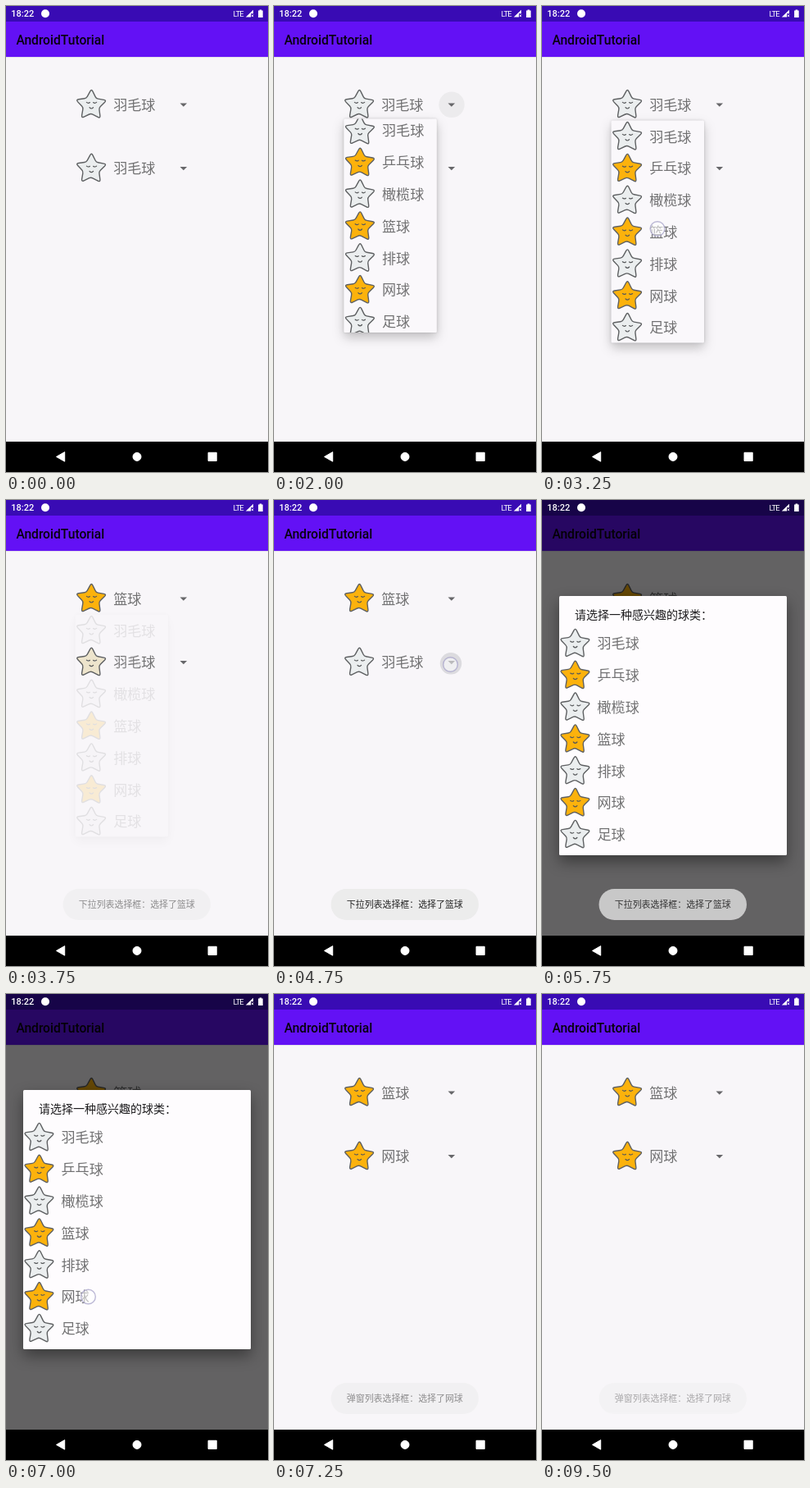
Animation, 320 px wide and 568 px high, one loop 9750 ms. Source, as an HTML page:

```html
<!DOCTYPE html>
<html lang="zh-CN">
<head>
<meta charset="utf-8">
<title>Spinner demo</title>
<style>
  html, body { margin: 0; width: 100%; height: 100%; overflow: hidden; background: #f8f6f9; }
  svg { display: block; }
  text { font-family: "Noto Sans CJK SC", "Noto Sans CJK", "Noto Sans", sans-serif; }
  .ui { font-family: Roboto, "Noto Sans", sans-serif; }
  .label { font-size: 17.1px; fill: #717172; }
  .card { filter: drop-shadow(0 6px 7px rgba(0,0,0,.2)) drop-shadow(0 0 1.5px rgba(0,0,0,.16)); }
  .dialog-card { filter: drop-shadow(0 8px 9px rgba(0,0,0,.4)); }
</style>
</head>
<body>
<svg id="stage" width="320" height="568" viewBox="0 0 320 568">
  <defs>
    <g id="star" stroke-linejoin="round" stroke-linecap="round">
      <path id="starBody" stroke="#5e6062" stroke-width="1.4"/>
      <path d="M-5.6 -3.4q2 1.7 4 .2M2.6 -3.2q2 1.5 4 -.2M-2 2.9q2.3 2.6 4.6 0" fill="none" stroke="#555759" stroke-width="1.2"/>
    </g>
    <path id="arrow" d="M-4.3 -2h8.6l-4.3 4.2z" fill="#67676a"/>
    <clipPath id="popClip"><rect id="popClipRect"/></clipPath>
  </defs>

  <rect width="320" height="568" fill="#f8f6f9"/>
  <rect y="62" width="320" height="1" fill="#e3dfea"/>
  <rect y="19" width="320" height="43" fill="#6311f5"/>
  <rect width="320" height="19" fill="#390bb4"/>
  <text class="ui" x="12.4" y="46.6" font-size="15.6" font-weight="500" fill="#08020f">AndroidTutorial</text>

  <circle id="ripple"/>
  <g id="first"></g>
  <g id="second"></g>
  <use href="#arrow" x="216.8" y="120.5"/>
  <use href="#arrow" x="216.8" y="198"/>

  <g id="popup">
    <rect id="popCard" class="card" rx="1.5" fill="#faf8fb"/>
    <g clip-path="url(#popClip)"><g id="popRows"></g></g>
  </g>

  <rect id="dim" width="320" height="531"/>
  <g id="dialog">
    <rect class="dialog-card" x="21" y="117" width="278" height="316" rx="1.5" fill="#fefcfe"/>
    <text x="40" y="145.2" font-size="14" fill="#1d1c1e">请选择一种感兴趣的球类：</text>
    <g id="dialogRows"></g>
  </g>

  <g id="toast">
    <rect x="69.5" y="474" width="180.5" height="38" rx="19" fill="#ececec"/>
    <text id="toastText" x="88.8" y="497.2" font-size="10.93" fill="#242424"></text>
  </g>
  <circle id="touch" r="8.8" fill="#fff" fill-opacity=".55" stroke="#a5a1c8" stroke-opacity=".75" stroke-width="1.4"/>

  <g fill="#fff">
    <text class="ui" x="6.3" y="13.3" font-size="11" font-weight="500">18:22</text>
    <circle cx="48" cy="9.3" r="5"/>
    <text class="ui" x="277.6" y="12.8" font-size="9.4" letter-spacing="-.9">LTE</text>
    <path d="M302 4.8v4.4h-3v4.3h-6.2z"/>
    <path d="M299.7 10.5l2.4 2.6m0-2.6l-2.4 2.6" stroke="#fff" stroke-width=".9"/>
    <path d="M309.6 4.4h2.6v1h1.5v8.6h-5.6v-8.6h1.5z"/>
  </g>

  <rect y="531" width="320" height="37"/>
  <g fill="#fff" stroke="#fff" stroke-linejoin="round">
    <path d="M61.5 549.4L71.7 543.6V555.2z"/>
    <circle cx="160" cy="549.4" r="5"/>
    <rect x="247" y="544.3" width="10.2" height="10.2"/>
  </g>
</svg>
<script>
const $ = id => document.getElementById(id);
const balls = ["羽毛球", "乒乓球", "橄榄球", "篮球", "排球", "网球", "足球"];
const PITCH = 38.83, LOOP = 9750;

const picked = {
  drop: "下拉列表选择框：选择了篮球",
  box: "弹窗列表选择框：选择了网球"
};

// Each step keeps the values of the one before it.
const steps = [
  [0, { first: 0, second: 0, touch: null, ripple: null, pop: 1, popAlpha: 0, dim: 0, dialog: 0, toast: 0, note: "drop" }],
  [1500, { touch: [216.5, 117.5] }],
  [1750, { touch: null, ripple: [217, 120, 14, "#e8e7ea"] }],
  [2000, { ripple: [217, 120.3, 15.7, "#ecebed"], pop: .955, popAlpha: 1 }],
  [3250, { ripple: null, pop: 1, touch: [141, 271.5] }],
  [3500, { touch: null }],
  [3750, { first: 3, popAlpha: .15, toast: .5 }],
  [4000, { popAlpha: 0, toast: 1 }],
  [4500, { touch: [215.5, 200.5] }],
  [4750, { ripple: [216, 199.3, 13.2, "#dcdbdf"] }],
  [5000, { touch: null, dim: .3, dialog: .5 }],
  [5250, { ripple: null, dim: .6, dialog: 1 }],
  [5750, { toast: .74 }],
  [6000, { toast: .12 }],
  [6250, { toast: 0 }],
  [7000, { touch: [100.5, 369] }],
  [7250, { touch: null, dim: 0, dialog: 0, second: 5, note: "box", toast: .5 }],
  [7500, { toast: 1 }],
  [9250, { toast: .8 }],
  [9500, { toast: .37 }]
];
const states = [];
steps.reduce((prev, [at, change]) => {
  const next = { ...prev, ...change };
  states.push([at, next]);
  return next;
}, {});

function starPath(outer, inner) {
  const pts = Array.from({ length: 10 }, (_, i) => {
    const a = (i / 5 - .5) * Math.PI + .02, r = i % 2 ? inner : outer;
    return [r * Math.cos(a), r * Math.sin(a)];
  });
  const mix = (a, b, k) => a.map((v, i) => (v + (b[i] - v) * k).toFixed(2)).join(" ");
  return pts.map((p, i) => {
    const before = pts[(i + 9) % 10], after = pts[(i + 1) % 10], k = i % 2 ? .18 : .27;
    return `${i ? "L" : "M"}${mix(p, before, k)}Q${mix(p, p, 0)} ${mix(p, after, k)}`;
  }).join("") + "Z";
}

const row = (i, x, y) =>
  `<use href="#star" x="${x}" y="${y + .6}" fill="${i % 2 ? "#fcb20c" : "#ebeeef"}"/>` +
  `<text class="label" x="${x + 27.2}" y="${y + 6.3}">${balls[i]}</text>`;
const list = (x, y) => balls.map((_, i) => row(i, x, y + i * PITCH)).join("");

function setAttrs(el, attrs) {
  for (const key in attrs) el.setAttribute(key, attrs[key]);
}
function setCircle(el, spot) {
  el.style.display = spot ? "" : "none";
  if (spot) setAttrs(el, { cx: spot[0], cy: spot[1] });
}

// The popup slides out of its anchor while its clip opens to full height.
function setPopup(p, alpha) {
  const rest = 1 - p, dx = 18 * rest, dy = -160 * rest, inset = 116 * rest;
  const box = { x: 84.5 + dx, y: 139.5 + dy + inset, width: 113.5, height: 271 - 2 * inset };
  setAttrs($("popCard"), box);
  setAttrs($("popClipRect"), box);
  setAttrs($("popRows"), { transform: `translate(${dx} ${dy})` });
  $("popup").style.opacity = alpha;
}

function show(s) {
  $("first").innerHTML = row(s.first, 104, 120.2);
  $("second").innerHTML = row(s.second, 104, 197.9);
  setCircle($("touch"), s.touch);
  setCircle($("ripple"), s.ripple);
  if (s.ripple) setAttrs($("ripple"), { r: s.ripple[2], fill: s.ripple[3] });
  setPopup(s.pop, s.popAlpha);
  $("dim").style.opacity = s.dim;
  $("dialog").style.opacity = s.dialog;
  $("toast").style.opacity = s.toast;
  $("toastText").textContent = picked[s.note];
}

$("starBody").setAttribute("d", starPath(19.8, 10.2));
$("popRows").innerHTML = list(104, 159.2);
$("dialogRows").innerHTML = list(40.3, 175);

const start = performance.now();
let current;
function tick() {
  const t = (performance.now() - start) % LOOP;
  const state = states.filter(([at]) => at <= t).pop()[1];
  if (state !== current) show(current = state);
  requestAnimationFrame(tick);
}
tick();
</script>
</body>
</html>
```
